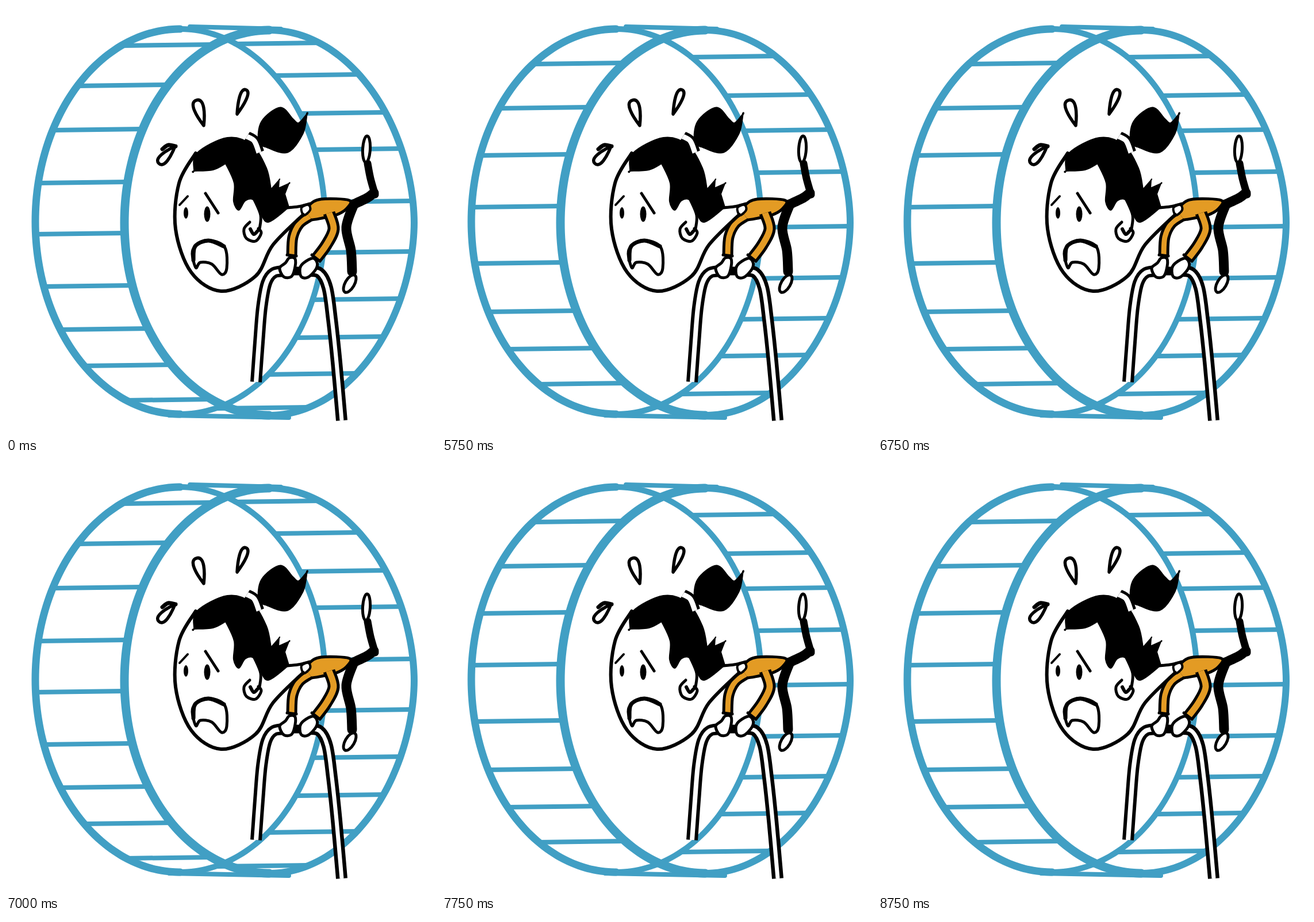
An HTML page for the animation above (9 s loop, 748x748 px).

```html
<!DOCTYPE html>
<html lang="en">
<head>
<meta charset="utf-8">
<title>Running wheel</title>
<style>
  html, body { margin: 0; height: 100%; overflow: hidden; background: #fff; }
  svg { display: block; width: 100vw; height: 100vh; stroke-linecap: round; stroke-linejoin: round; }
</style>
</head>
<body>
<svg id="stage" viewBox="0 0 748 748"></svg>
<script>
const BLUE = '#419fc4', ORANGE = '#e39b24', BLACK = '#000', WHITE = '#fff';
const stage = document.getElementById('stage');

function add(parent, tag, attributes = {}) {
  const node = document.createElementNS('http://www.w3.org/2000/svg', tag);
  for (const name in attributes) node.setAttribute(name, attributes[name]);
  return parent.appendChild(node);
}

// Smooth curve through "x,y x,y ..."; a repeated point makes a corner.
function curve(text, closed) {
  const points = text.split(' ').map(pair => pair.split(',').map(Number));
  const n = points.length;
  const at = i => closed ? points[(i + n) % n] : points[Math.max(0, Math.min(n - 1, i))];
  let d = 'M' + points[0];
  for (let i = 0; i < (closed ? n : n - 1); i++) {
    const [a, b, c, e] = [at(i - 1), at(i), at(i + 1), at(i + 2)];
    const out = b.map((v, k) => v + (c[k] - a[k]) / 6);
    const into = c.map((v, k) => v - (e[k] - b[k]) / 6);
    d += `C${out} ${into} ${c}`;
  }
  return closed ? d + 'Z' : d;
}

const line = (points, width, stroke = BLACK, cap = 'round') =>
  add(stage, 'path', { d: curve(points), fill: 'none', stroke, 'stroke-width': width, 'stroke-linecap': cap });
const shape = (points, fill, width = 0) =>
  add(stage, 'path', { d: curve(points, true), fill, stroke: BLACK, 'stroke-width': width });
const oval = (cx, cy, rx, ry, angle = 0, fill = BLACK) =>
  add(stage, 'ellipse', { cx, cy, rx, ry, fill, stroke: BLACK, 'stroke-width': fill === BLACK ? 0 : 5,
    transform: `rotate(${angle} ${cx} ${cy})` });

// An outlined tube, open at both ends.
function tube(points, fill, inner, outer) {
  line(points, outer, BLACK, 'butt');
  line(points, inner, fill, 'butt');
}

// A teardrop hanging from its tip.
const drop = (x, y, angle, length, width) =>
  add(stage, 'path', {
    d: `M0,0C${width * .5},${length * .4} ${width},${length} 0,${length}S${-width * .5},${length * .4} 0,0Z`,
    transform: `translate(${x} ${y}) rotate(${angle})`, fill: WHITE, stroke: BLACK, 'stroke-width': 5.5
  });

// Wheel: two hoops, each in halves so that every half has its own brush width.
const hoop = (cx, cy, side, width, power = 2) => ({ cx, cy, side, width, power });
const nearLeft = hoop(303, 375, -1, 13), nearRight = hoop(303, 375, 1, 10);
const farLeft = hoop(458, 377, -1, 15), farRight = hoop(458, 377, 1, 12, 1.85);
const HOOP_RX = 252, HOOP_RY = 335;

function edge({ cx, cy, side, power }, y) {
  const t = Math.min(1, Math.abs(y - cy) / HOOP_RY);
  return cx + side * HOOP_RX * Math.sqrt(1 - t ** power);
}

function drawHoop(half) {
  const points = Array.from({ length: 61 }, (_, i) => {
    const y = half.cy - HOOP_RY * Math.cos(Math.PI * i / 60);
    return `${edge(half, y)},${y}`;
  });
  line(points.join(' '), half.width, BLUE);
}

// Rungs rise slightly to the right and end on the hoops.
function rungs(group, heights, from, to) {
  for (const y of heights)
    add(group, 'path', { d: `M${edge(from, y)},${y + 1}L${edge(to, y)},${y - 1}`, stroke: BLUE, 'stroke-width': 8 });
}

function pose(left, right) {
  const group = add(stage, 'g');
  rungs(group, left, nearLeft, farLeft);
  rungs(group, right, nearRight, farRight);
  return group;
}

const poses = [
  pose([68, 138, 215, 307, 396, 487, 562, 625, 685], [65, 120, 186, 249, 340, 428, 510, 576, 640, 699]),
  pose([100, 177, 259, 349, 447, 531, 596, 657], [88, 155, 216, 289, 384, 473, 544, 608, 674])
];
[nearRight, nearLeft, farLeft, farRight].forEach(drawHoop);
line('320,36 478,40', 8, BLUE);
line('284,712 492,716', 8, BLUE);

// Legs and feet
line('598,348 628,334 640,325', 17);
line('642,328 634,300 629,274', 13);
line('605,345 592,385 600,425 602,462', 17);
oval(627, 249, 6.5, 23, 3, WHITE);
oval(598, 483, 8, 17, 30, WHITE);

// Neck, hand rail, torso and arms
shape('486,351 530,342 564,370 545,432 505,440 495,385 452,440 450,375', WHITE);
tube('435,654 440,585 445,525 453,482 466,464 488,461', WHITE, 8, 20);
tube('520,461 545,464 559,490 567,545 575,620 584,721', WHITE, 7, 20);
line('492,461 524,461', 15);
line('488,351 508,349 528,344', 5);
shape('527,347 548,336 597,338 592,353 573,364 550,369 530,372 518,368', ORANGE, 5);
tube('528,366 510,379 499,402 497,434', ORANGE, 9, 19);
tube('562,360 570,388 557,416 539,440', ORANGE, 11, 21);
line('489,433 505,435', 5);
line('532,433 546,444', 5);
shape('514,351 526,346 529,355 518,364', WHITE, 4);
shape('493,438 503,440 502,458 496,471 483,471 476,456 486,447', WHITE, 5);
shape('532,439 541,446 539,458 525,472 513,470 513,452', WHITE, 5);

// Head
line('330,256 301,308 295,388 322,463 374,496 434,470 464,416 517,363', 6);
shape('327,287 327,287 332,256 385,229 428,242 453,282 461,319 461,319 475,303 475,303 474,317 474,317 492,309 492,309 485,327 485,327 492,350 492,350 456,376 441,355 430,337 416,339 405,355 396,340 397,308 382,274 382,274 360,285', BLACK, 2);
shape('440,236 445,201 477,177 499,197 509,204 523,189 523,189 516,222 490,254 455,246', BLACK, 3);
tube('419,227 432,235 440,255', WHITE, 9, 19);

// Ear and earring
line('432,337 443,364 441,388', 5);
line('424,376 414,388 418,404 434,409 444,395 439,387', 5);
line('425,388 431,397 438,391', 6);

// Expression
oval(313, 360, 4, 10);
oval(350, 362, 5.5, 13.5);
line('302,346 316,331', 4);
line('347,326 369,360', 5);
shape('330,455 325,424 350,408 380,419 384,456 375,467 358,449 338,446', WHITE, 5);
line('326,442 329,418 352,408 379,418', 7);

// Sweat drops
drop(344, 208, 164, 46, 15);
drop(402, 188, 200, 45, 11);
drop(294, 244, 43, 41, 13);
line('272,249 282,242 295,244', 7);

// The wheel rests for a while, then flickers between its two poses.
function frame(now) {
  const time = now % 9000;
  const turned = time >= 5250 && Math.floor(time / 250) % 2 === 1;
  poses.forEach((group, i) => group.setAttribute('visibility', turned === (i === 1) ? 'visible' : 'hidden'));
  requestAnimationFrame(frame);
}
frame(0);
</script>
</body>
</html>
```
